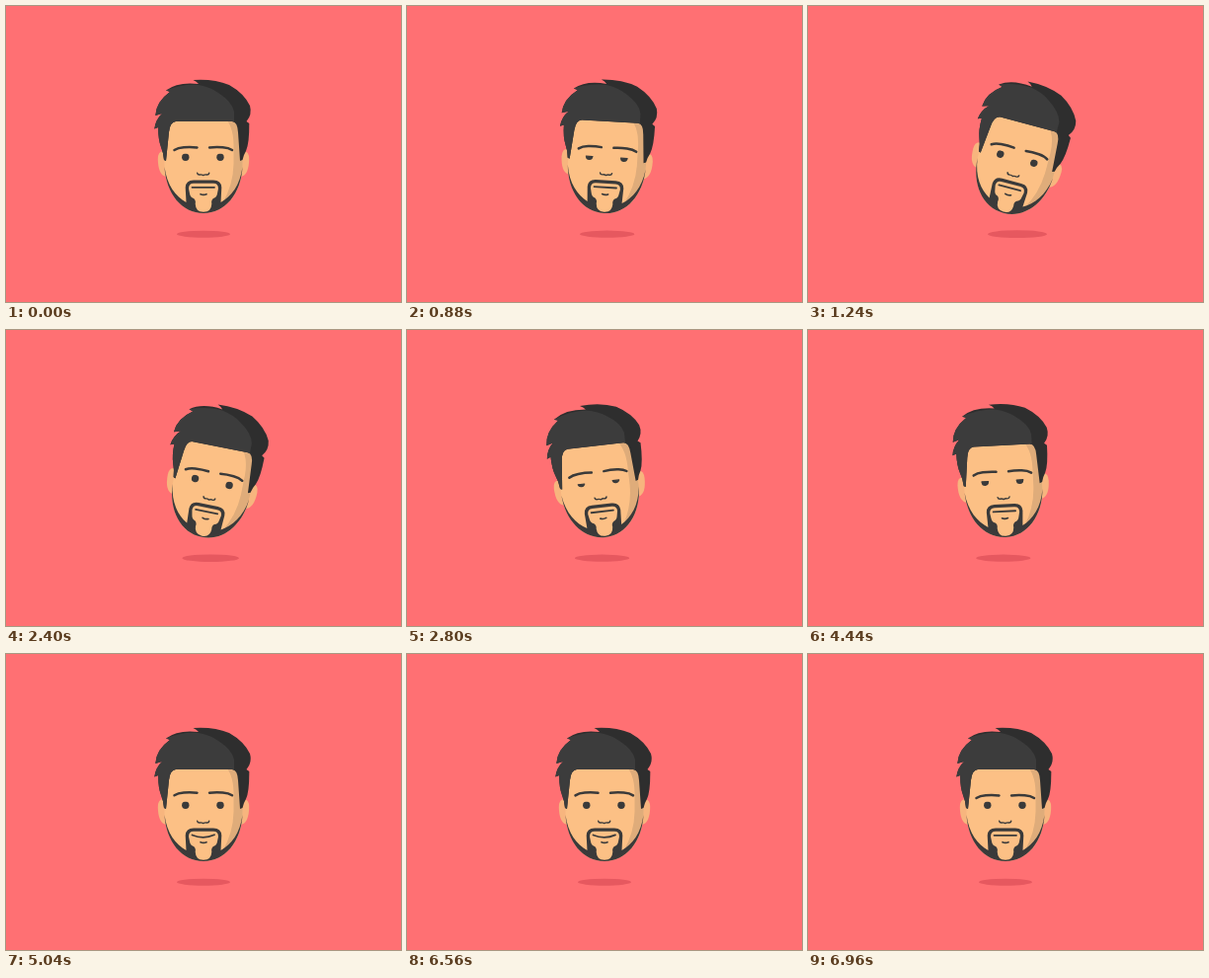
Recreate the animation shown at these times as an HTML page. Size 400 by 300 pixels, loop 7000 ms.

```html
<!DOCTYPE html>
<html lang="en">
<head>
<meta charset="utf-8">
<title>Tilting head</title>
<style>
  html, body { margin: 0; width: 100%; height: 100%; overflow: hidden; background: #ff7073; }
  svg { display: block; width: 100%; height: 100%; }
  .skin { fill: #fcc085; }
  .ear { fill: #f7b57e; }
  .shade { fill: #dfac7a; }
  .dark { fill: #3a3a3a; }
  .hair { fill: #2e2e2e; }
  .light { fill: #3c3c3c; }
  .line { fill: none; stroke: #3a3a3a; stroke-linecap: round; stroke-linejoin: round; }
</style>
</head>
<body>
<svg viewBox="0 0 400 300">
  <defs>
    <path id="facePath" d="M160 112 L160.5 163 C162 190 178 210 200 210 C222 210 238 190 239.5 163 L240 112 Z"/>
    <path id="hairPath" d="M162 157 L160 156 Q159.500 149 157 143 Q154 135 154.200 123 L150.300 124.500
      Q151.500 115 158 109 L151.300 111 Q152 97 166 87 L162 85.500
      Q174 76.500 195 79 Q193 76.500 189.500 75 Q210 73.500 226 80 Q241 88.500 247 101
      Q249.500 110 243.500 117 L246.300 119 Q246.500 139 243 147 Q240.500 151 239.500 156
      L237 157 L235 128 Q234.500 117.500 229 117 H172 Q166 117.500 165 128 Z"/>
    <path id="earPath" d="M162 148 Q154 145 153.800 155 Q154 171 162 173 Z"/>
    <clipPath id="faceClip"><use href="#facePath"/></clipPath>
    <clipPath id="hairClip"><use href="#hairPath"/></clipPath>
    <clipPath id="eyeClip"><rect id="lid" x="175" y="149" width="50" height="20"/></clipPath>
  </defs>
  <rect width="400" height="300" fill="#ff7073"/>
  <ellipse id="shadow" cx="200" cy="231.200" fill="#e6585f"/>
  <g id="head">
    <use href="#earPath" class="ear"/>
    <use href="#earPath" class="ear" transform="matrix(-1 0 0 1 400 0)"/>
    <use href="#facePath" class="skin"/>
    <path class="shade" clip-path="url(#faceClip)" d="M220 112 Q230 120 230.500 140 V160 Q230 182 219 200 L245 205 V112 Z"/>
    <path class="dark" d="M160.500 163 C162 190 178 210 200 210 C222 210 238 190 239.500 163
      C237 182 228 193 217.500 199 L218.300 184 Q218 176.500 210 176.500 H190 Q182 176.500 181.700 184
      L182.500 199 C172 193 163 182 160.500 163 Z"/>
    <path class="skin" d="M185 185 Q185 179.800 190 179.800 H210 Q215 179.800 215 185 L214 190
      Q213.500 194 210 195 Q207.500 197 208.300 200.500 Q208 208.800 200 208.800 Q192 208.800 191.700 200.500
      Q192.500 197 190 195 Q186.500 194 186 190 Z"/>
    <path class="line" id="mouth" stroke-width="1.8"/>
    <path class="line" stroke-width="1.6" d="M197 190.700 Q200 192 203 190.700"/>
    <path class="line" stroke-width="1.4" d="M193.700 169.300 Q194 171.300 196.500 171 Q198 170.600 199.700 171.600 Q201.500 170.600 203 171 Q205.400 171.300 205.700 169.300"/>
    <g class="dark" clip-path="url(#eyeClip)">
      <circle cx="181.800" cy="153.200" r="3.700"/>
      <circle cx="217" cy="153.200" r="3.700"/>
    </g>
    <path class="line" id="lashes" stroke-width="1.200"/>
    <path class="line" id="brows" stroke-width="2.500" d="M170.500 146 Q174 143.600 180 143.200 Q187 142.600 193.500 143.400 M229 146 Q225.500 143.600 219.500 143.200 Q212.500 142.600 206 143.400"/>
    <use href="#hairPath" class="hair"/>
    <path class="light" clip-path="url(#hairClip)" d="M145 88 L162 85.500 Q178 79 195 80 Q208 82.500 215 88 Q229 97 231 107 L231 117.500 H172 L166 160 H145 Z"/>
  </g>
</svg>
<script>
  const LOOP = 7000, STEP = 40, TILT = 15;
  const el = id => document.getElementById(id);
  const ease = (t, from, to) => {
    const p = Math.min(1, Math.max(0, (t - from) / (to - from)));
    return p * p * (3 - 2 * p);
  };
  const blinkAt = (t, middle, half = 220) => Math.max(0, 1 - Math.abs(t - middle) / half);

  function render(t) {
    const angle = TILT * (ease(t, 720, 1240) - 2 * ease(t, 2200, 3120) + ease(t, 4040, 4600));
    el('head').setAttribute('transform', `rotate(${angle} 200 201)`);

    // The shadow pauses under the upright head on its way across.
    const right = ease(t, 720, 1240) - ease(t, 2200, 2660);
    const left = ease(t, 2660, 3120) - ease(t, 4040, 4600);
    const spread = right + left;
    el('shadow').setAttribute('cx', 200 + 12 * right - 11 * left);
    el('shadow').setAttribute('rx', 27 + 3 * spread);
    el('shadow').setAttribute('ry', 3.5 + 0.4 * spread);

    const blink = Math.max(blinkAt(t, 980), blinkAt(t, 2720), blinkAt(t, 4320));
    const lidY = 149.4 + 7.2 * blink;
    el('lid').setAttribute('y', lidY);
    el('lashes').setAttribute('d', blink > 0.25 ? `M178.500 ${lidY} h6.600 M213.700 ${lidY} h6.600` : '');

    const smile = ease(t, 4600, 5040) - ease(t, 6520, 6960);
    el('mouth').setAttribute('d', `M188.500 ${183.8 - 0.3 * smile} Q200 ${183.8 + 4.5 * smile} 211 ${183.8 - 0.5 * smile}`);
    el('brows').setAttribute('transform', `translate(0 ${-2.7 * smile})`);
  }

  function tick() {
    const t = performance.now() % LOOP;
    render(t - t % STEP);
    requestAnimationFrame(tick);
  }
  tick();
</script>
</body>
</html>
```
